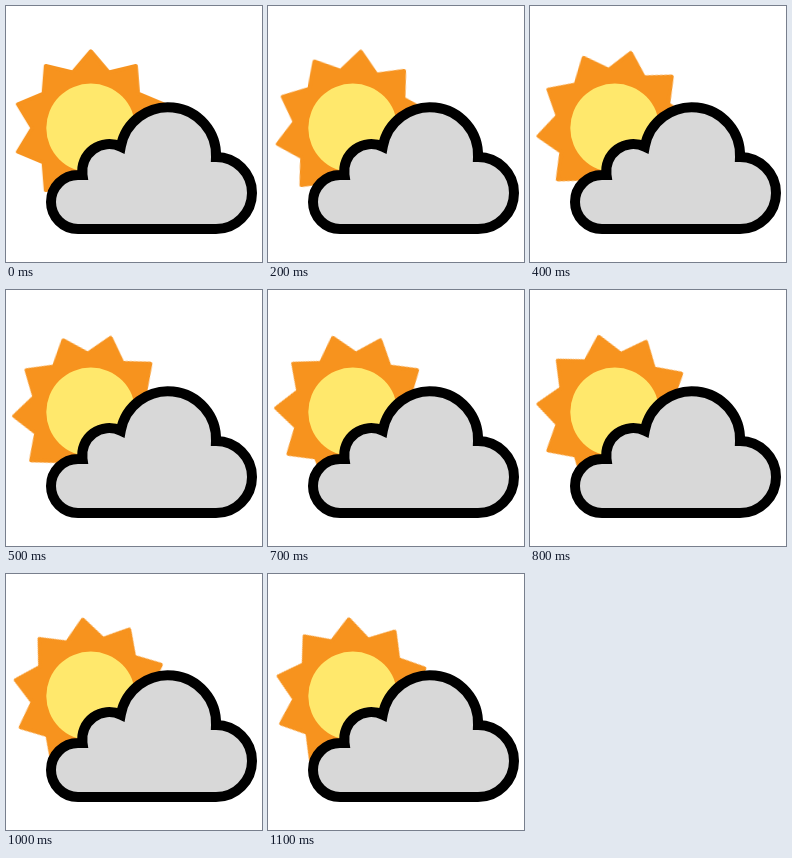
An HTML page for the animation above (1.2 s loop, 256 by 256 pixels).

```html
<!DOCTYPE html>
<html lang="en">
<head>
<meta charset="utf-8">
<title>Sun behind cloud</title>
<style>
  html, body { margin: 0; width: 100%; height: 100%; overflow: hidden; background: #fff; }
  svg { display: block; width: 100%; height: 100%; }
  #rays {
    fill: #f7931e;
    stroke: #f7931e;
    stroke-width: 4;
    stroke-linejoin: round;
    transform-origin: 0 0;
    animation: turn 1.2s steps(12) infinite;
  }
  .disc { fill: #ffe86c; }
  .cloud { fill: #d8d8d8; stroke: #000; stroke-width: 10; stroke-linejoin: miter; }
  /* one ray spacing per loop, so the star lands on itself */
  @keyframes turn {
    from { transform: rotate(0deg); }
    to { transform: rotate(36deg); }
  }
</style>
</head>
<body>
<svg viewBox="0 0 256 256">
  <g transform="translate(84.8 122)">
    <polygon id="rays"/>
    <circle class="disc" r="44.5"/>
  </g>
  <path class="cloud" d="M72 223 A27 27 0 0 1 72 169 H76.5
    A27 27 0 0 1 114.8 140.7 A48 48 0 0 1 210 151
    A36 36 0 0 1 210 223 Z"/>
</svg>
<script>
  const RAYS = 10, TIP = 76.6, VALLEY = 58.4;
  const points = Array.from({ length: RAYS * 2 }, (_, i) => {
    const angle = i * Math.PI / RAYS;
    const r = i % 2 ? VALLEY : TIP;
    return `${(r * Math.sin(angle)).toFixed(2)},${(-r * Math.cos(angle)).toFixed(2)}`;
  });
  document.getElementById('rays').setAttribute('points', points.join(' '));
</script>
</body>
</html>
```
